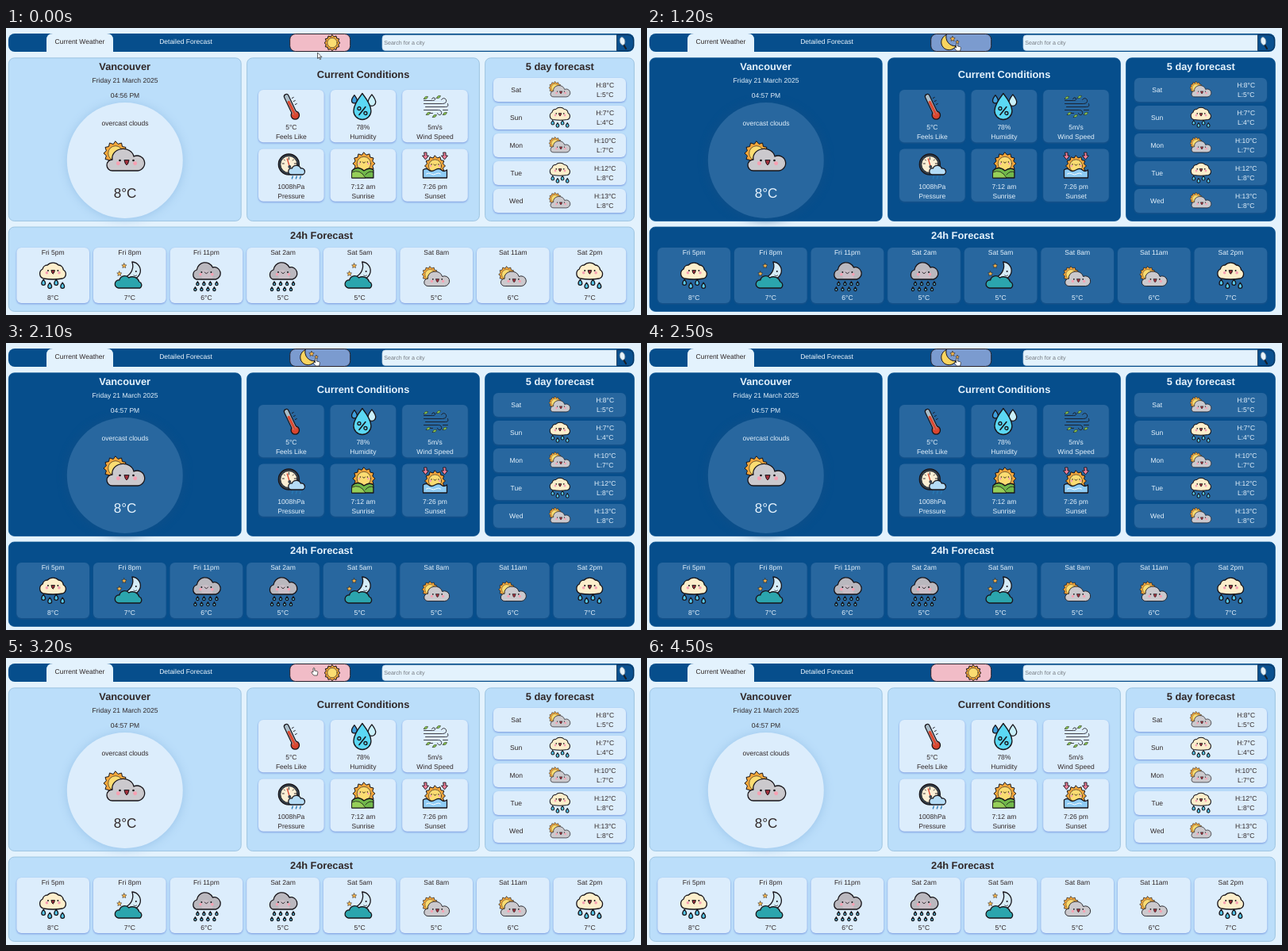
Animation of 800 by 362 pixels, one loop 4.6 s. Source, as an HTML page:

```html
<!DOCTYPE html>
<html lang="en">
<head>
<meta charset="utf-8">
<title>Weather dashboard</title>
<style>
:root {
  --panel: #bbdefa; --border: #92bbda; --card: #dcedfc; --ink: #302727;
  --shade: #7897df; --glow: #9cc5ea; --toggle: #f1bcc7;
}
.dark {
  --panel: #064e8c; --border: #064e8c; --card: #28679f; --ink: #e6f3fd;
  --shade: #1c5389; --glow: #104f88; --toggle: #7b9bcf;
}
html, body { margin: 0; width: 100%; height: 100%; overflow: hidden; background: #e3f2fd; }
svg { display: block; width: 100%; height: 100%; }
text { font-family: Arial, "Liberation Sans", sans-serif; text-anchor: middle; fill: var(--ink); text-rendering: geometricPrecision; }
.panel { fill: var(--panel); stroke: var(--border); stroke-width: .8; }
.card { fill: var(--card); filter: drop-shadow(0 1.5px 1px var(--shade)); }
.disc { fill: var(--card); filter: drop-shadow(0 1.5px 6px var(--glow)); }
.icon { stroke: #171419; stroke-width: 1.3; stroke-linejoin: round; stroke-linecap: round; }
.flat { stroke: none; }
</style>
</head>
<body>
<svg id="stage" viewBox="0 0 800 362"></svg>
<script>
const LOOP = 4600, DARK_FROM = 500, DARK_TO = 2600;
const BODY = 8.53, HEAD = 12.8;
const stage = document.getElementById('stage');

const text = (x, y, str, size = BODY, attrs = '') =>
  `<text x="${x}" y="${y + size * .36}" font-size="${size}" ${attrs}>${str}</text>`;
const heading = (x, y, str) => text(x, y, str, HEAD, 'font-weight="bold"');
const rect = (x, y, w, h, r, attrs) =>
  `<rect x="${x}" y="${y}" width="${w}" height="${h}" rx="${r}" ${attrs}/>`;
const panel = (x, y, w, h) => rect(x, y, w, h, 7, 'class="panel"');
const card = (x, y, w, h) => rect(x, y, w, h, 6, 'class="card"');
const shape = (d, fill = 'none', attrs = '') => `<path d="${d}" fill="${fill}" ${attrs}/>`;
const dot = (x, y, r, fill, attrs = 'class="flat"') =>
  `<circle cx="${x}" cy="${y}" r="${r}" fill="${fill}" ${attrs}/>`;

function burst(x, y, outer, inner, points, fill, attrs = '') {
  const corners = Array.from({ length: points * 2 }, (_, i) => {
    const a = i * Math.PI / points - Math.PI / 2, r = i % 2 ? inner : outer;
    return `${(x + r * Math.cos(a)).toFixed(2)},${(y + r * Math.sin(a)).toFixed(2)}`;
  });
  return `<polygon points="${corners.join(' ')}" fill="${fill}" ${attrs}/>`;
}
const sun = (x, y, r) => burst(x, y, r, r * .8, 12, '#f5a83c', 'stroke-width="1"') +
  dot(x, y, r * .62, '#fbdc72', 'stroke-width=".6"');
const star = (x, y, r = 3.2) => burst(x, y, r, r * .5, 5, '#f8b64c', 'stroke-width=".5"');

function drop(x, y, r, fill = '#55c8ee', attrs = '') {
  const d = `M${x} ${y - 2 * r}Q${x + r} ${y - r * .7} ${x + r} ${y}A${r} ${r} 0 0 1 ${x - r} ${y}Q${x - r} ${y - r * .7} ${x} ${y - 2 * r}Z`;
  return shape(d, fill, attrs);
}
// Eyes, cheeks and an open or closed smile.
function face(x, y, s, open) {
  const side = k => dot(x + k * 10 * s, y, 1.6 * s, '#171419') + dot(x + k * 12.5 * s, y + 4.5 * s, 2.9 * s, '#f7a0b2');
  const mouth = `M${x - 3.5 * s} ${y}q${3.5 * s} ${open ? 14 * s : 6 * s} ${7 * s} 0`;
  return side(-1) + side(1) + shape(mouth + (open ? 'Z' : ''), open ? '#a5303c' : 'none', `stroke-width="${open ? 1 : .8}"`);
}

const icons = {
  cloudSun: sun(-12, -4, 15) +
    shape('M-16 18A7 7 0 0 1-16 4A13 11 0 0 1 11 0A9.5 9.5 0 1 1 16 18Z', '#cbc9cd') +
    shape('M16 17A9 9 0 0 0 22 4Q25 15 16 17Z', '#aaa7b0', 'class="flat"') + face(2, 5, .85, true),
  sunRain:
    shape('M-12 4A6.5 6.5 0 0 1-13-8A6 6 0 0 1-7-13A9 8 0 0 1 7-13A6.5 6.5 0 0 1 13-7A6 6 0 0 1 12 4Q0 6-12 4Z', '#fdeecb') +
    face(0, -6, .62, true) +
    drop(-12, 10, 2.4) + drop(-4, 14, 2.4) + drop(4, 10, 2.4) + drop(12, 14, 2.4),
  rain:
    shape('M-13 5A6.5 6.5 0 0 1-12-7A10.5 10.5 0 0 1 8-10A7.5 7.5 0 1 1 12 5Z', '#bab8be') +
    shape('M-5 4Q-10-6-1-7Q4-7 5-2Q8-4 8 4Z', '#cbbfc7', 'class="flat"') + face(0, -4, .6, false) +
    [-11, -3, 5, 13].map((x, i) => drop(x, 11, 1.6) + drop(x - 3, 18, 1.6)).join(''),
  night: shape('M3-17A11 11 0 1 1-5 2A15 15 0 0 0 3-17Z', '#d6ecf7') +
    dot(8, -5, 1, '#171419') + shape('M5 0q2 2 4 0', 'none', 'stroke-width=".7"') +
    shape('M-14 16A5 5 0 0 1-13 6A7 7 0 0 1-1 3A9 9 0 0 1 12 8A4.5 4.5 0 0 1 13 16Z', '#2ba5ad') +
    star(-13, -2) + star(-7, -12),
  thermometer: shape('M-6-13L4 8', 'none', 'stroke-width="7"') + dot(5, 10.5, 5.2, '#d8452f', '') +
    shape('M-6-13L4 8', 'none', 'style="stroke:#a9bdc9;stroke-width:4.6"') +
    shape('M-3-6L5 10', 'none', 'style="stroke:#dc4a32;stroke-width:3.4"') +
    shape('M1-11l2-1M3-7l2-1M5-3l2-1', 'none', 'stroke-width=".9"'),
  humidity: drop(-11, -8, 3.4, '#3f9edb') + drop(11, -6, 4.8, '#c9f0fb') + drop(-1, 5, 11, '#5bd8f4') +
    shape('M3 0L-5 10', 'none', 'stroke-width="1.6"') + dot(-5, 2, 2, 'none', '') + dot(3, 8, 2, 'none', ''),
  wind: '<g stroke-width=".8">' +
    shape('M-14-8H-3Q1-8 0-11Q-3-13-4-10M-14-4H9Q15-4 14-9Q11-13 8-9M-12 0H13Q18 0 16-4M-14 4H4Q9 4 8 9Q5 12 3 8M-9 8H-3M10 4H16') + '</g>' +
    [[-12, -11], [4, -12], [-9, 9], [12, 9], [-1, 12]].map(([x, y]) =>
      shape(`M${x - 2} ${y + 1}q1-4 5-3q-1 4-5 3Z`, '#8bc653', 'stroke-width=".5"')).join(''),
  gauge: dot(-3, -2, 13, '#34424d', '') + dot(-3, -2, 10.5, '#fbefd5', 'stroke-width=".8"') +
    shape('M-3-11v3M-11-3h2M4-3h3M-9-8l1 1M3-8l-1 1', 'none', 'stroke-width=".9"') +
    shape('M-5-9L-2 1', 'none', 'style="stroke:#d8452f"') + dot(-2, 1, 2, '#38414c') +
    shape('M0 11A4 4 0 0 1 1 3A6 6 0 0 1 12 3A4 4 0 0 1 14 11Z', '#b5dcf6') +
    shape('M2 13l-1 3M7 13l-1 3M12 13l-1 3', 'none', 'style="stroke:#287ab5"'),
  sunrise: sun(1, -3, 14) + face(1, -5, .45, false) +
    shape('M-14 15V6Q-7-1 1 6Q8 1 13 5V15Z', '#71b84b') +
    shape('M-14 8Q-4 3 3 15H-14Z', '#96cf58', 'stroke-width=".8"') +
    shape('M3 11Q8 5 13 8', 'none', 'stroke-width=".8"'),
  sunset: sun(0, 0, 13) + face(0, -2, .45, false) +
    shape('M-15 5Q-11 2-8 5T0 5T8 5T15 5V15H-15Z', '#8ecbf3') +
    shape('M-11 10q3-2 6 0t6 0t6 0', 'none', 'style="stroke:#fff;stroke-width:1"') +
    [-12, 12].map(x => shape(`M${x - 1.5}-17h3v4h2.5l-4 5l-4-5h2.5Z`, '#ef7f99', 'stroke-width=".9"')).join(''),
  dayKnob: sun(0, 0, 10),
  nightKnob: shape('M-3-10A9.8 9.8 0 1 0 9 4A11.5 11.5 0 0 1-3-10Z', '#f9d45f', 'stroke-width="1"') +
    star(5, -5, 3.4) + star(11, -1, 2.4),
};
const icon = (name, x, y, s = 1, id = '') =>
  `<g ${id && `id="${id}"`} class="icon" transform="translate(${x} ${y}) scale(${s})">${icons[name]}</g>`;

function header() {
  return rect(3, 7, 788.5, 23, 8, 'fill="#064e8c"') +
    shape('M51 30V15Q51 7 59 7H127Q135 7 135 15V30Z', '#e3f2fd') +
    text(93, 17, 'Current Weather', BODY, 'style="fill:#302727"') +
    text(226.5, 17, 'Detailed Forecast', BODY, 'style="fill:#eff8ff"') +
    rect(357.7, 7.5, 76, 22, 7, 'fill="var(--toggle)" stroke="#28222b" stroke-width="1"') +
    rect(474, 9, 299, 19.5, 4, 'fill="#e3f2fd" stroke="#b9cfe0" stroke-width=".7"') +
    text(476.2, 18.7, 'Search for a city', 7.11, 'style="fill:#757b80;text-anchor:start"') +
    shape('M769.5 8.7H783Q790.5 8.7 790.5 16V21Q790.5 28.7 783 28.7H769.5Z', '#09508f', 'stroke="#0b2b4c" stroke-width=".8"') +
    shape('M778 21L781 26', 'none', 'stroke="#17202a" stroke-width="2.2" stroke-linecap="round"') +
    '<ellipse cx="776.5" cy="16.5" rx="3.2" ry="5" fill="#e7f4fb" stroke="#8093a3" stroke-width=".8" transform="rotate(-12 776.5 16.5)"/>';
}

function today() {
  return panel(3.4, 37.8, 292.8, 205.6) + heading(149.7, 48.4, 'Vancouver') +
    text(150, 65.8, 'Friday 21 March 2025') + text(150, 84.5, '04:56 PM', BODY, 'id="clock"') +
    '<circle class="disc" cx="149.8" cy="167" r="73"/>' +
    text(150, 120.2, 'overcast clouds') + icon('cloudSun', 150, 162) + text(150, 208, '8°C', 17.07);
}

function conditions() {
  const items = [
    ['thermometer', '5°C', 'Feels Like'], ['humidity', '78%', 'Humidity'], ['wind', '5m/s', 'Wind Speed'],
    ['gauge', '1008hPa', 'Pressure'], ['sunrise', '7:12 am', 'Sunrise'], ['sunset', '7:26 pm', 'Sunset'],
  ];
  return panel(303.6, 37.8, 292.8, 205.6) + heading(450, 58.7, 'Current Conditions') +
    items.map(([name, value, label], i) => {
      const x = 318 + i % 3 * 90.6, y = 78 + (i > 2) * 74.5, mid = x + 41.3;
      return card(x, y, 82.6, 66.3) + icon(name, mid, y + 21.5) +
        text(mid, y + 47.3, value) + text(mid, y + 59.3, label);
    }).join('');
}

function week() {
  const days = [['Sat', 8, 5], ['Sun', 7, 4], ['Mon', 10, 7], ['Tue', 12, 8], ['Wed', 13, 8]];
  return panel(603.6, 37.8, 187.8, 205.6) + heading(697.8, 48.5, '5 day forecast') +
    days.map(([day, high, low], i) => {
      const y = 63 + i * 35;
      return card(614, y, 167, 30) + text(642.7, y + 15, day) +
        (i % 2 ? icon('sunRain', 698, y + 14.5, .77) : icon('cloudSun', 698, y + 14.5, .52)) +
        text(754.7, y + 9.2, `H:${high}°C`) + text(754.7, y + 21.2, `L:${low}°C`);
    }).join('');
}

function hours() {
  const items = [
    ['Fri 5pm', 'sunRain', 8], ['Fri 8pm', 'night', 7], ['Fri 11pm', 'rain', 6], ['Sat 2am', 'rain', 5],
    ['Sat 5am', 'night', 5], ['Sat 8am', 'cloudSun', 5], ['Sat 11am', 'cloudSun', 6], ['Sat 2pm', 'sunRain', 7],
  ];
  return panel(3.4, 251, 788, 106.4) + heading(397.5, 261.8, '24h Forecast') +
    items.map(([hour, name, temp], i) => {
      const x = 13.4 + i * 96.6, mid = x + 45.8;
      return card(x, 277, 91.6, 70) + text(mid, 283.3, hour) +
        icon(name, mid, name === 'cloudSun' ? 313.5 : 312, name === 'cloudSun' ? .67 : 1) + text(mid, 340, temp + '°C');
    }).join('');
}

const cursors =
  '<g id="cursor" stroke="#222" stroke-width=".7" stroke-linejoin="round" fill="#fff">' +
  '<path id="arrow" d="M0 0V7.5L1.8 6L3 8.7L4.2 8.2L3 5.6H5.4Z"/>' +
  '<path id="hand" d="M-1.5 1V-4Q-.6-5.5.3-4V-1L3.4-.4Q4.5 0 4.3 1.5L3.6 5H-.7L-3.5 1.8Q-3.8.3-2.5.4Z"/></g>';

stage.innerHTML = header() + today() + conditions() + week() + hours() +
  icon('dayKnob', 411, 18.7, 1, 'day') + icon('nightKnob', 380, 18.7, 1, 'moon') + cursors;

const el = id => document.getElementById(id);
const [clock, day, moon, cursor, arrow, hand] = ['clock', 'day', 'moon', 'cursor', 'arrow', 'hand'].map(el);
const show = (node, on) => node.setAttribute('visibility', on ? 'visible' : 'hidden');
const progress = (t, from, to) => Math.min(1, Math.max(0, (t - from) / (to - from)));

function draw(now) {
  const t = Math.floor(now % LOOP / 100) * 100;
  const dark = t >= DARK_FROM && t < DARK_TO;
  stage.classList.toggle('dark', dark);
  show(day, !dark);
  show(moon, dark);
  clock.textContent = t < DARK_FROM ? '04:56 PM' : '04:57 PM';

  const enter = progress(t, 0, 200), leave = progress(t, 2900, 3200);
  const x = 392.5 - 1.5 * enter - 2.5 * leave, y = 31 - 7 * enter - 7 * leave;
  const present = t < 3400, pointing = y < 29.5;
  cursor.setAttribute('transform', `translate(${x} ${y})`);
  show(arrow, present && !pointing);
  show(hand, present && pointing);
  requestAnimationFrame(draw);
}
requestAnimationFrame(draw);
</script>
</body>
</html>
```
